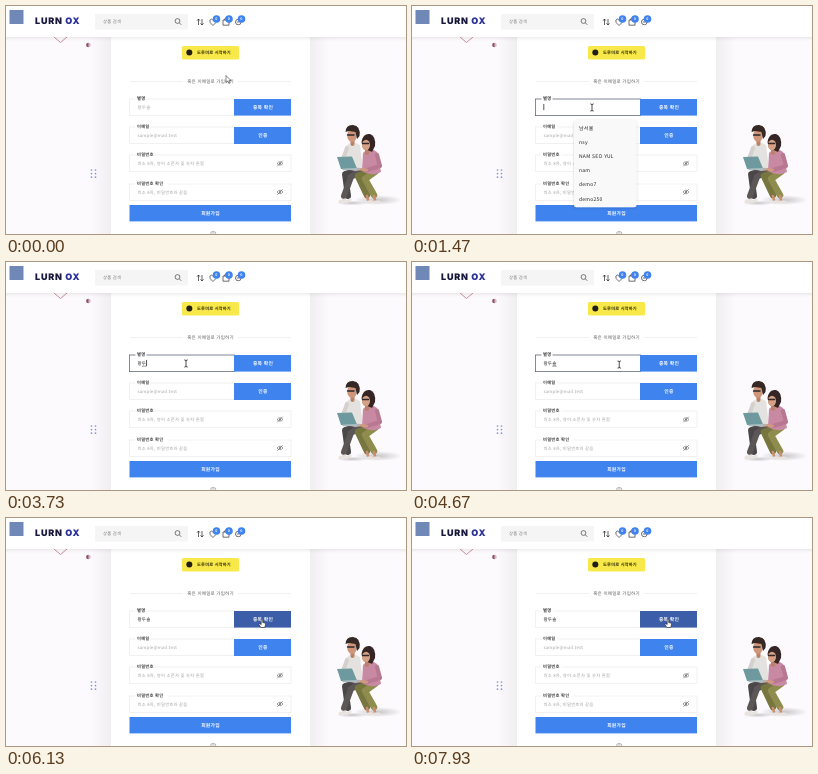
Animation, 400 px wide and 228 px high, one loop 8000 ms. Source, as an HTML page:

```html
<!DOCTYPE html>
<html lang="ko">
<head>
<meta charset="utf-8">
<style>
html, body { margin: 0; width: 100%; height: 100%; overflow: hidden; background: #fcfafc; }
svg { display: block; width: 100vw; height: 100vh; }
text {
  font-family: "Noto Sans CJK KR", "Noto Sans CJK", "Noto Sans", sans-serif;
  letter-spacing: .05em; white-space: pre; text-rendering: geometricPrecision;
}
.brand { font-family: Inter, sans-serif; letter-spacing: .8px; }
</style>
</head>
<body>
<svg id="stage" viewBox="0 0 400 228">
  <defs>
    <linearGradient id="edge">
      <stop offset="0" stop-color="#777" stop-opacity="0"/>
      <stop offset="1" stop-color="#777" stop-opacity=".09"/>
    </linearGradient>
    <linearGradient id="headerShade" x2="0" y2="1">
      <stop offset="0" stop-color="#555" stop-opacity=".1"/>
      <stop offset="1" stop-color="#555" stop-opacity="0"/>
    </linearGradient>
    <radialGradient id="ground">
      <stop offset="0" stop-color="#777" stop-opacity=".4"/>
      <stop offset="1" stop-color="#777" stop-opacity="0"/>
    </radialGradient>
    <filter id="soft" x="-20%" y="-20%" width="140%" height="150%">
      <feDropShadow dx="0" dy=".8" stdDeviation="1.2" flood-opacity=".2"/>
    </filter>
  </defs>
  <g id="page"></g>

  <!-- Seated couple with a laptop -->
  <g stroke-linecap="round" stroke-linejoin="round" fill="none">
    <ellipse cx="372" cy="194" rx="24" ry="5" fill="url(#ground)"/>
    <ellipse cx="346" cy="197" rx="16" ry="2.5" fill="url(#ground)"/>
    <path d="M351 164L339 168L342 190" stroke="#4b4749" stroke-width="6"/>
    <path d="M354 165L345 171L338 190" stroke="#5c5657" stroke-width="6"/>
    <path d="M368 164L352 170L361 189" stroke="#77763f" stroke-width="6.5"/>
    <path d="M370 165L359 173L368 189" stroke="#8f8d4e" stroke-width="6.5"/>
    <path d="M361 190l1 4M368 190l1 4" stroke="#c98e72" stroke-width="2.6"/>
    <path d="M334 195.5L339 194M341 195.5L344 194M362 196h3M369 196h4" stroke="#e9e2de" stroke-width="3"/>
    <path d="M340 140Q346 134 354 139L357 163Q348 167 340 162Z" fill="#e4e2df"/>
    <path d="M341 142L337 153L343 159" stroke="#d3d0cd" stroke-width="4"/>
    <path d="M357 147Q364 140 371 146L375 166Q365 171 356 165Z" fill="#c88aa2"/>
    <path d="M371 149L374 160L361 164" stroke="#b97892" stroke-width="4.2"/>
    <path d="M361 164L352 163" stroke="#d29a7e" stroke-width="2.4"/>
    <path d="M331 151L346 150.5L351 162.5L335 163Z" fill="#6d999f"/>
    <path d="M337 163.5L354 163" stroke="#a9bcc0" stroke-width="1.3"/>
    <path d="M346.5 133v5M361 142v5" stroke="#bd8166" stroke-width="4"/>
    <ellipse cx="346" cy="129.5" rx="4.8" ry="6.3" fill="#cf967a"/>
    <path d="M339.5 126Q340 118.5 347 119Q355 120 353.5 130L351 133L349.5 126L343 125Z" fill="#352825"/>
    <path d="M341.5 129h6.5" stroke="#29282c" stroke-width="1.4"/>
    <path d="M355.5 136Q357 127 364 128Q370 130 369 140L366 146L357 142Z" fill="#352625"/>
    <ellipse cx="360" cy="139" rx="4" ry="5.3" fill="#d6a084"/>
    <path d="M356.5 137.5h6" stroke="#33282b" stroke-width="1.3"/>
  </g>

  <g id="typing">
    <rect id="focus" x="123.5" y="93" width="105" height="16.6" fill="none" stroke="#687080" stroke-width=".8"/>
    <rect x="129.5" y="91" width="11" height="4" fill="#fff"/>
    <text x="131" y="93.8" font-size="4.3" font-weight="700" fill="#444">별명</text>
    <text id="entry" x="131.5" y="102.8" font-size="4.5"></text>
    <path id="underline" stroke="#333" stroke-width=".5"/>
    <path id="caret" stroke="#111" stroke-width=".7"/>
  </g>

  <rect id="check" x="228" y="93" width="57" height="16.6"/>
  <text x="257" y="102.8" font-size="4.8" font-weight="700" fill="#fff" text-anchor="middle">중복 확인</text>

  <g id="menu"></g>

  <g id="pointer">
    <path id="arrow" d="M0 0V7L1.7 5.5L2.9 8L4 7.5L2.9 5.1H5Z" fill="#fff" stroke="#333" stroke-width=".6"/>
    <path id="beam" d="M-1.7 -3.6Q0 -3.6 0 -2.5Q0 -3.6 1.7 -3.6M0 -2.8V2.8M-1.7 3.6Q0 3.6 0 2.5Q0 3.6 1.7 3.6" fill="none" stroke="#222" stroke-width=".8"/>
    <path id="hand" d="M-.8 -3Q0 -4 .7 -3V0L3 .6Q3.8 1 3.5 2.3L2.7 5H-1.1L-3.2 1.7Q-2.8 .5 -.8 2Z" fill="#fff" stroke="#222" stroke-width=".6"/>
  </g>
</svg>
<script>
const LOOP = 8000;
const BLUE = '#3f83ef';
const $ = id => document.getElementById(id);

const rect = (x, y, w, h, fill, extra = '') =>
  `<rect x="${x}" y="${y}" width="${w}" height="${h}" fill="${fill}" ${extra}/>`;
const label = (x, y, size, text, fill = '#333', extra = '') =>
  `<text x="${x}" y="${y}" font-size="${size}" fill="${fill}" ${extra}>${text}</text>`;
const line = (d, color, width = .7) =>
  `<path d="${d}" fill="none" stroke="${color}" stroke-width="${width}"/>`;
const dot = (x, y, r, fill) => `<circle cx="${x}" cy="${y}" r="${r}" fill="${fill}"/>`;
const BOLD = 'font-weight="700"';
const CENTER = 'text-anchor="middle" ' + BOLD;

const field = (y, width, title, hint) =>
  rect(123.5, y, width, 16.6, '#fff', 'stroke="#e8e8ea" stroke-width=".6"') +
  rect(129.5, y - 2, title.length * 4.2 + 3, 4, '#fff') +
  label(131, y + .8, 4.3, title, '#444', BOLD) +
  label(131.5, y + 9.8, 4.3, hint, '#a4a4a6');

const hiddenEye = y =>
  line(`M271 ${y}Q274 ${y - 3.6} 277 ${y}Q274 ${y + 3.6} 271 ${y}ZM271.2 ${y + 2.8}L276.8 ${y - 2.8}`, '#666', .6) +
  dot(274, y, .9, '#666');

const badge = x => dot(x, 13, 3.8, BLUE) + label(x, 14.3, 3.6, '0', '#fff', CENTER);

function drawPage() {
  let dots = '';
  for (let i = 0; i < 6; i++) dots += dot(85.5 + i % 2 * 4, 164 + (i >> 1) * 3.6, .85, '#8093e6');

  $('page').innerHTML =
    rect(0, 0, 400, 228, '#fcfafc') +
    rect(85, 31, 20, 197, 'url(#edge)') +
    rect(-324, 31, 20, 197, 'url(#edge)', 'transform="scale(-1 1)"') +
    rect(105, 31, 199, 197, '#fff') +
    line('M48 31L54.5 36.5L61 31', '#b0607a', .7) +
    dot(82.5, 39, 2.3, '#dcbcca') + '<path d="M82.5 36.7a2.3 2.3 0 0 0 0 4.6Z" fill="#8d526c"/>' +
    dots +
    rect(0, 31, 400, 4, 'url(#headerShade)') + rect(0, 0, 400, 31, '#fff') +
    rect(3.5, 4, 14, 14, '#6f88b8') +
    label(29, 17.5, 9, 'LURN <tspan fill="#2c329b">OX</tspan>', '#18183d', 'class="brand" font-weight="900"') +
    rect(89, 8, 93, 15.5, '#f5f5f6', 'rx="1"') + label(97, 17.2, 4.3, '상품 검색', '#777') +
    '<circle cx="171.5" cy="15" r="2.4" fill="none" stroke="#444" stroke-width=".7"/>' +
    line('M173.3 16.8L175.3 18.8', '#444') +
    line('M192.5 19V13M191 14.7L192.5 13L194 14.7M196 13V19M194.5 17.3L196 19L197.5 17.3', '#222') +
    line('M207 19.5Q203 16.5 203.8 14.2Q205.5 12 207 14.2Q208.5 12 210.2 14.2Q211 16.5 207 19.5Z', '#333') +
    line('M217 14h6v5.2h-6ZM218.5 14q0-2 1.5-2t1.5 2', '#333') +
    line('M229.5 16a2.8 2.8 0 1 0 5.6 0a2.8 2.8 0 1 0-5.6 0M231 16h2.5', '#333') +
    [210.5, 223, 235.5].map(badge).join('') +
    rect(176, 40, 57, 13.5, '#f9e849', 'rx="1.5"') + dot(183.3, 46.5, 3, '#211e12') +
    label(191, 48.3, 4.2, '도루미로 시작하기', '#2b280f', BOLD) +
    line('M124 75.5H177M232 75.5H285', '#e8e8e9', .6) +
    label(204.5, 77, 4.5, '혹은 이메일로 가입하기', '#555', 'text-anchor="middle"') +
    field(93, 105, '별명', '') +
    field(121, 105, '이메일', 'sample@mail.test') +
    field(149, 161.5, '비밀번호', '최소 8자, 영어 소문자 및 숫자 혼합') +
    field(178, 161.5, '비밀번호 확인', '최소 8자, 비밀번호와 같음') +
    hiddenEye(157.5) + hiddenEye(186) +
    rect(228, 121, 57, 17, BLUE) + label(257, 131, 4.8, '인증', '#fff', CENTER) +
    rect(123.5, 199, 161.5, 16.4, BLUE) + label(204.5, 208.7, 4.8, '회원가입', '#fff', CENTER) +
    line('M204.5 228a2.7 2.7 0 0 1 5.4 0M206 227h2.5', '#999');
}

// Nickname text by time: Latin letters, erased, then composed as Hangul.
const ENTRIES = [
  [0, ''], [1070, ''], [2000, 'g'], [2200, 'gh'], [2530, 'ghk'], [2650, 'ghkd'],
  [2800, 'gh'], [2900, ''], [3050, 'ㅎ'], [3150, '호'], [3300, '화'], [3400, '황'],
  [3550, '황ㄷ'], [3700, '황두'], [3770, '황둣'], [3830, '황두소'], [3890, '황두솔']
];
const HISTORY = ['남서율', 'nsy', 'NAM SEO YUL', 'nam', 'demo7', 'demo250'];
const FOCUS_AT = 1070, BLUR_AT = 5900;

// Pointer keys: time, x, y
const PATH = [[0, 220, 69.5], [130, 220, 69.5], [870, 180, 101.5], [4400, 180, 101.5], [5070, 256, 104.5], [LOOP, 256, 104.5]];

const clamp = v => Math.max(0, Math.min(1, v));
const show = (id, on) => $(id).setAttribute('visibility', on ? 'inherit' : 'hidden');

function pointerAt(t) {
  const i = PATH.findIndex((key, n) => n && t <= key[0]);
  const [t0, x0, y0] = PATH[i - 1], [t1, x1, y1] = PATH[i];
  const p = (t - t0) / (t1 - t0), eased = p * p * (3 - 2 * p);
  return [x0 + (x1 - x0) * eased, y0 + (y1 - y0) * eased];
}

let menuKey = '';
function drawMenu(items) {
  const key = items.join();
  if (key === menuKey) return;
  menuKey = key;
  $('menu').innerHTML = items.length
    ? rect(162, 114, items.length > 1 ? 62.5 : 61, items.length * 14.2 + 2, '#f9f9fa', 'rx="2.5" filter="url(#soft)"') +
      items.map((item, i) => label(167, 124 + i * 14.1, 5, item, '#222')).join('')
    : '';
}

function drawEntry(t, focused) {
  const [changedAt, value] = ENTRIES.filter(entry => entry[0] <= t).pop();
  const entry = $('entry');
  const text = value || (focused ? '' : '황두솔');
  if (entry.textContent !== text) entry.textContent = text;
  entry.setAttribute('fill', value ? '#222' : '#aaa');

  const end = 131.5 + (value ? entry.getComputedTextLength() : 0);
  $('caret').setAttribute('d', `M${end + .3} 98v6.2`);
  show('caret', focused && (t - changedAt) % 1000 < 500);
  $('underline').setAttribute('d', `M${end - 4.3} 104.2H${end}`);
  show('underline', focused && value > 'z');
  return value;
}

function render(t) {
  const focused = t >= FOCUS_AT && t < BLUR_AT;
  const value = drawEntry(t, focused);
  show('focus', focused);
  drawMenu(t >= 1200 && t < 2000 ? HISTORY : value === 'g' || value === 'gh' && t < 2530 ? ['gha-demo'] : []);

  const [x, y] = pointerAt(t);
  const inRow = y > 93 && y < 110;
  const overButton = inRow && x > 228;
  $('pointer').setAttribute('transform', `translate(${x} ${y})`);
  show('arrow', !inRow);
  show('beam', inRow && !overButton);
  show('hand', overButton);

  const hover = clamp((t - 4820) / 150);
  const shade = [[63, 60], [131, 94], [239, 168]].map(([a, b]) => Math.round(a + (b - a) * hover));
  $('check').setAttribute('fill', `rgb(${shade})`);
}

function tick() {
  render(performance.now() % LOOP);
  requestAnimationFrame(tick);
}

drawPage();
tick();
</script>
</body>
</html>
```
